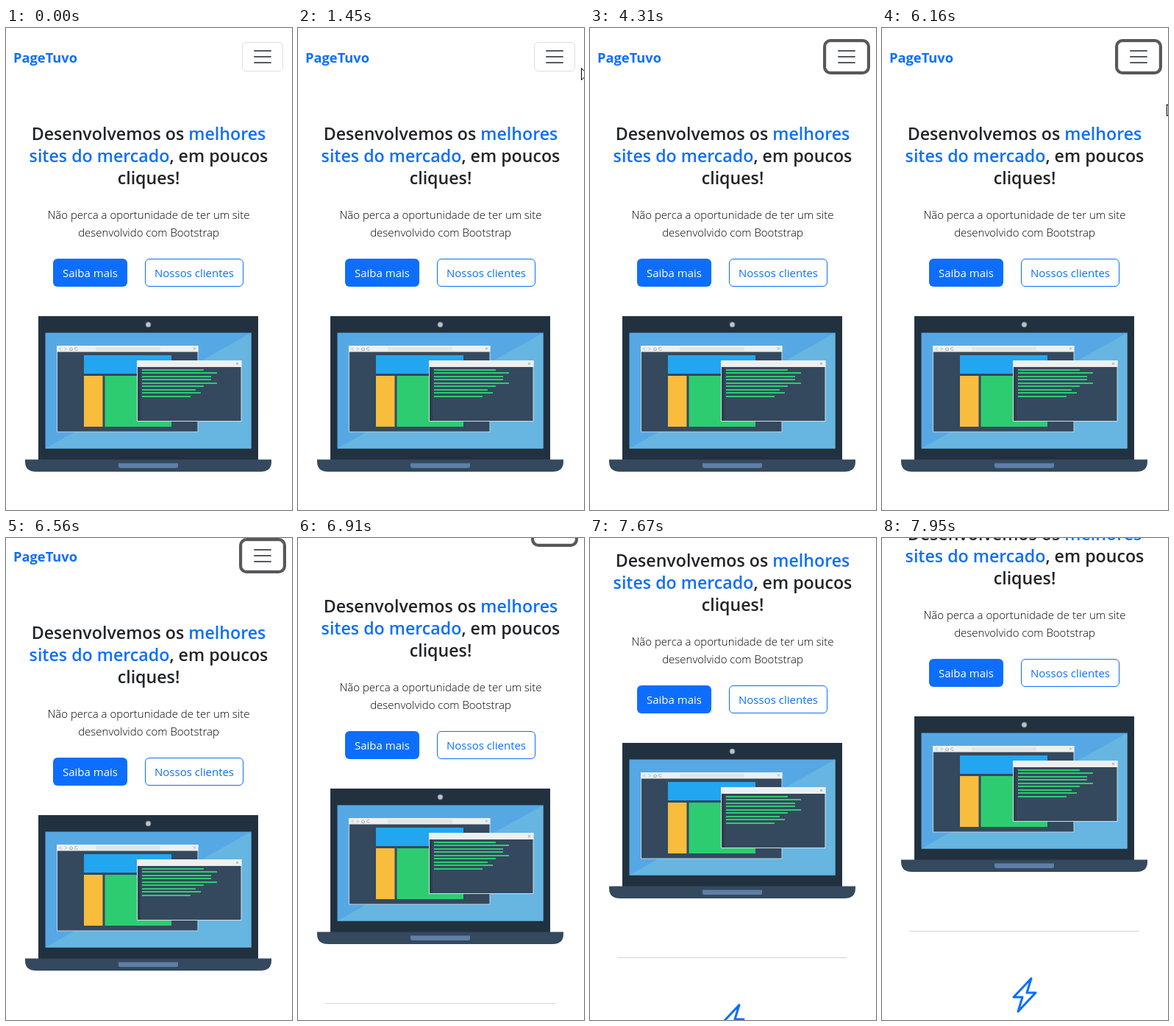
These frames come from a looping animation (389x654 px, 8 s). An HTML page:

```html
<!DOCTYPE html>
<html lang="pt-BR">
<head>
<meta charset="utf-8">
<title>PageTuvo</title>
<style>
  html, body { margin: 0; width: 100%; height: 100%; overflow: hidden; background: #fff; }
  svg { display: block; width: 100%; height: 100%; }
  text { font: 15px "Open Sans", "Noto Sans", sans-serif; fill: #212529; }
  .brand { font-size: 18.3px; font-weight: 700; }
  .title { font-size: 23.2px; font-weight: 600; }
  .lead { font-weight: 300; fill: #000; }
  .mid { text-anchor: middle; }
  .blue { fill: #0d6efd; }
  .link { fill: #595959; }
  .cursor path { fill: #fff; stroke: #000; stroke-linejoin: round; }
</style>
</head>
<body>
<svg viewBox="0 0 389 654">
  <clipPath id="menuClip"><rect id="menuWindow" x="0" y="59" width="389" height="0"/></clipPath>

  <g id="page">
    <g class="mid">
      <text class="title" x="194" y="152">Desenvolvemos os <tspan class="blue">melhores</tspan></text>
      <text class="title" x="194" y="182"><tspan class="blue">sites do mercado</tspan>, em poucos</text>
      <text class="title" x="194" y="212">cliques!</text>
      <text class="lead" x="194" y="259">Não perca a oportunidade de ter um site</text>
      <text class="lead" x="194" y="283">desenvolvido com Bootstrap</text>
      <rect class="blue" x="64" y="313" width="101" height="38" rx="6"/>
      <text x="114.5" y="338" style="fill:#fff">Saiba mais</text>
      <rect x="189.5" y="313.5" width="133" height="37" rx="5.5" fill="#fff" stroke="#0d6efd"/>
      <text class="blue" x="256" y="338">Nossos clientes</text>
    </g>

    <!-- laptop -->
    <path fill="#22313f" d="M44 391h299v195H44z"/>
    <circle cx="193.5" cy="402.5" r="3.4" fill="#bdc3c7" stroke="#7f8c8d"/>
    <path fill="#56a8e5" d="M53.5 413.5h280v157h-280z"/>
    <path fill="#67b5e1" d="M333.5 413.5v157h-280z"/>
    <path fill="#34495e" d="M26 585.5h335v3q0 13.5-15 13.5H41q-15 0-15-13.5z"/>
    <path fill="#5f7fa8" d="M153 590.5h81v4q0 2.5-3 2.5h-75q-3 0-3-2.5z"/>

    <!-- browser window -->
    <rect x="69.5" y="431.5" width="191.5" height="116.5" fill="#34495e" stroke="#c5d3de"/>
    <path fill="#ecf0f1" d="M69 431h192.5v8.5H69z"/>
    <path fill="#dfe5e7" d="M122 433h88v5h-88z"/>
    <path fill="none" stroke="#95a0a6" stroke-width=".8" d="M75 433.5l-2 2 2 2M80 433.5l2 2-2 2M86 436l2.500-2.500 2.500 2.500M87 435.500v2h3v-2M97 434a2 2 0 1 0 .5 2M255 433.500l3 3m0-3l-3 3"/>
    <path fill="#23a6f0" d="M106 444h119v25H106z"/>
    <path fill="#f8bd3c" d="M106 472h25.500v69H106z"/>
    <path fill="#2ecc71" d="M134.5 472H225v69h-90.5z"/>

    <!-- code window -->
    <rect x="178.5" y="451.5" width="141.5" height="82" fill="#34495e" stroke="#d5dfe6"/>
    <path fill="#2c3e50" d="M179 460h4v73h-4z"/>
    <path fill="#ecf0f1" d="M178 451h142.5v9H178z"/>
    <path fill="none" stroke="#7f8c8d" stroke-width=".8" d="M313 454l3 3m0-3l-3 3"/>
    <g id="code" stroke="#2ecc71" stroke-width="2"></g>

    <path fill="#d3d4d5" d="M37 682h313v1H37z"/>
    <path transform="translate(170 745) scale(3)" fill="none" stroke="#0d6efd" stroke-linejoin="round" d="M11 .5L9 7h4L5 15.5 7 9H3z"/>

    <!-- navigation bar -->
    <rect id="navBack" y="3" width="389" height="72" fill="#fff"/>
    <text class="brand blue" x="10" y="47">PageTuvo</text>
    <rect id="ring" x="317" y="15" width="64" height="48" rx="10" fill="#58585b"/>
    <rect x="321.5" y="19.5" width="55" height="39" rx="5.5" fill="#fff" stroke="#dedfe0"/>
    <path stroke="#555b60" stroke-width="2" stroke-linecap="round" d="M338 31h22M338 39h22M338 47h22"/>
    <g id="menu" clip-path="url(#menuClip)"></g>
  </g>

  <g id="cursor" class="cursor">
    <path id="arrow" d="M.5 .5V16.5L4.2 13 6.7 18.5 9 17.5 6.6 12H11.5z"/>
    <path id="hand" transform="translate(-6 0)" d="M5.5 14V2.2a1.6 1.6 0 0 1 3.2 0V8.5q1.3-1 2.6.6 1.4-.9 2.5.8 2.6-.4 2.7 2V16q0 2-1.5 4v2.5H7V20.5L1 14q-.9-2 .8-2.4 1.4 0 3.7 3z"/>
  </g>
</svg>
<script>
const LOOP = 8000, STEP = 70;
const $ = id => document.getElementById(id);

$("code").innerHTML = [269, 287, 279, 279, 287, 269, 258, 265, 251]
  .map((end, i) => `<path d="M185 ${Math.floor(464 + i * 4.5)}H${end}"/>`).join("");
$("menu").innerHTML = ["Home", "Sobre", "Serviços", "Clientes", "Contato"]
  .map((label, i) => `<text class="link" x="10" y="${84 + i * 40}">${label}</text>`).join("");

// The picture advances in short steps within each burst of movement.
const bursts = [0, 1450, 1880, 2210, 2690, 3150, 3370, 3830, 4310, 6160, 6420, 7180, 7250];
function stepped(t) {
  const start = bursts.filter(b => b <= t).pop();
  return start + Math.floor((t - start) / STEP) * STEP;
}

const clamp = u => Math.min(1, Math.max(0, u));
const smooth = u => u * u * (3 - 2 * u);
const ramp = (t, start, length) => clamp((t - start) / length);

// Linear interpolation through [time, value] pairs.
function track(keys, t) {
  const next = keys.findIndex(k => k[0] > t);
  if (next < 0) return keys[keys.length - 1][1];
  if (next === 0) return keys[0][1];
  const [t0, a] = keys[next - 1], [t1, b] = keys[next];
  return a + (b - a) * (t - t0) / (t1 - t0);
}

const scrollKeys = [[6350, 0], [6420, 3], [6560, 15], [6910, 51], [7110, 69], [7180, 72],
  [7250, 73], [7390, 78], [7530, 92], [7810, 133], [7950, 149]];
const cursorX = [[1450, 385], [1880, 363], [3150, 363], [3370, 361], [4040, 361], [4310, 395],
  [6159, 395], [6160, 387]];
const cursorY = [[1450, 54], [1880, 43], [3150, 43], [3370, 33], [4040, 33], [4310, 50],
  [6159, 50], [6160, 103]];

function draw(now) {
  const t = stepped(now % LOOP);
  $("page").setAttribute("transform", `translate(0 ${-Math.round(track(scrollKeys, t))})`);

  const open = smooth(ramp(t, 2270, 400)) - smooth(ramp(t, 3830, 380));
  $("menuWindow").setAttribute("height", 200 * open);
  $("navBack").setAttribute("height", 72 + 200 * open);

  const spread = 4 * ramp(t, 2150, 150), ring = $("ring");
  ring.setAttribute("x", 321 - spread);
  ring.setAttribute("y", 19 - spread);
  ring.setAttribute("width", 56 + 2 * spread);
  ring.setAttribute("height", 40 + 2 * spread);
  ring.setAttribute("rx", 6 + spread);
  ring.style.opacity = spread / 4;

  const x = Math.round(track(cursorX, t)), y = Math.round(track(cursorY, t));
  const shown = t >= 1450 && t < 4310 || t >= 6160 && t < 6420;
  $("cursor").setAttribute("transform", `translate(${x} ${y})`);
  $("cursor").style.display = shown ? "" : "none";
  $("arrow").style.display = x >= 377 ? "" : "none";
  $("hand").style.display = x < 377 ? "" : "none";
}

const startTime = performance.now();
function frame() {
  draw(performance.now() - startTime);
  requestAnimationFrame(frame);
}
frame();
</script>
</body>
</html>
```
